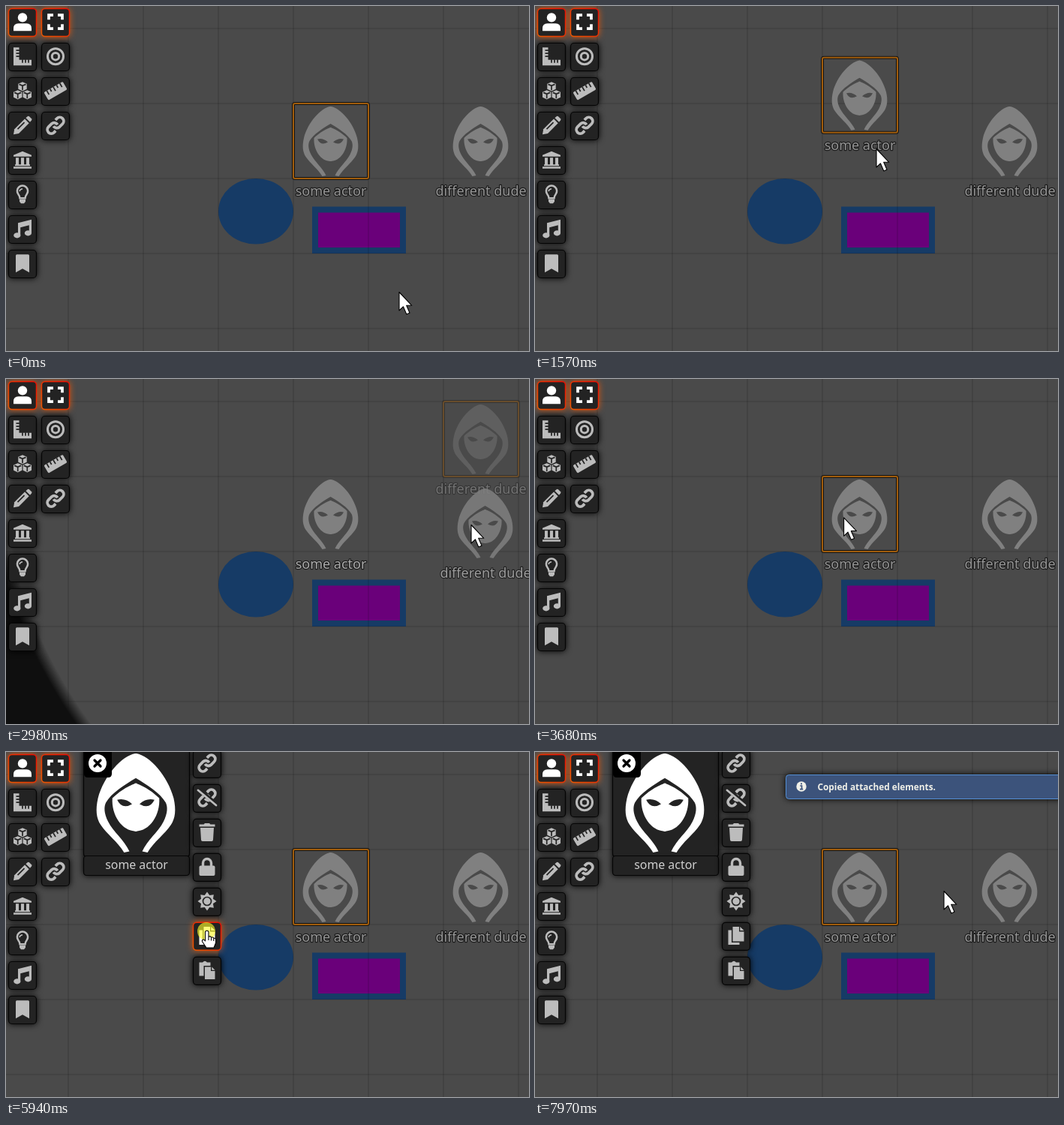
Recreate the animation shown at these times as an HTML page. Size 697 by 460 pixels, loop 8000 ms.

```html
<!DOCTYPE html>
<html lang="en">
<head>
<meta charset="utf-8">
<title>Token attachment</title>
<style>
  html, body { margin: 0; width: 100%; height: 100%; overflow: hidden; background: #4a4a4a; }
  svg { display: block; width: 697px; height: 460px; }
  text { font-family: "Noto Sans", "Open Sans", sans-serif; font-weight: 500; }
  .label { font-size: 18px; text-anchor: middle; paint-order: stroke; stroke: #1c1c1c; stroke-width: 2.4px; stroke-linejoin: round; }
  .icon { fill: currentColor; color: #bcbcbc; }
  .s { fill: none; stroke: currentColor; }
  .k { fill: none; stroke: #232323; stroke-width: 1.7; }
  .box { fill: #232323; stroke: #050505; stroke-width: 1.2; }
  .btn, .panel { filter: drop-shadow(0 0 4px #000); }
  .btn.on { filter: drop-shadow(0 0 4.5px #ff5a00c8); }
  .btn.on .box { stroke: url(#hot); stroke-width: 1.4; }
  .btn.on .icon { color: #fff; }
</style>
</head>
<body>
<svg viewBox="0 0 697 460">
  <defs>
    <linearGradient id="hot" x1="0" y1="1" x2="1" y2="0">
      <stop offset="0" stop-color="#f05a00"/><stop offset="1" stop-color="#f00800"/>
    </linearGradient>
    <radialGradient id="sight" gradientUnits="userSpaceOnUse" cx="633" cy="180" r="660">
      <stop offset=".975" stop-color="#0f0f0f" stop-opacity="0"/><stop offset="1" stop-color="#0f0f0f"/>
    </radialGradient>
    <g id="half">
      <path d="M51 4H49.5C37 6 20 25 14.5 46C12 57 13 65 17 71C23 80 33 87 39 97L44 96C39 85 29 78 24 68C20 60 20 54 22 50C27 41 40 33 50 27H51Z"/>
      <path fill-rule="evenodd" d="M51 32H50C41 35 33 41 28 46C27 62 37 77 50 77H51ZM32.5 47.5Q40 45.5 46.5 51.5Q37 57 32.5 47.5Z"/>
    </g>
    <g id="cowl"><use href="#half"/><use href="#half" transform="translate(100)scale(-1 1)"/></g>
  </defs>

  <rect width="697" height="460" fill="#4a4a4a"/>
  <g id="drawings" fill="#163b66">
    <ellipse cx="333" cy="273.75" rx="50" ry="43.75"/>
    <rect x="412" y="271.5" width="117" height="54.5" fill="#6a007a" stroke="#163b66" stroke-width="8"/>
  </g>
  <path id="grid" stroke="#000" stroke-opacity=".2" fill="none"/>
  <g id="tokens"></g>
  <rect id="dark" width="697" height="460" fill="url(#sight)"/>

  <g id="tools"></g>
  <g id="hud">
    <g class="panel">
      <rect class="box" x="103.5" y="-6" width="141" height="145" rx="3"/>
      <rect class="box" x="103.5" y="138.5" width="141" height="26" rx="4"/>
    </g>
    <use href="#cowl" fill="#fff" transform="translate(102 -3.7)scale(1.42)"/>
    <path d="M104 0H141V29Q141 34 136 34H109Q104 34 104 29Z"/>
    <circle cx="122" cy="15" r="12" fill="#fff"/>
    <path d="M118 11l8 8m0-8l-8 8" stroke="#000" stroke-width="3.2" stroke-linecap="round"/>
    <text x="174" y="156" font-size="15.9" text-anchor="middle" fill="#cfcfcf">some actor</text>
  </g>
  <g id="note">
    <rect class="panel" x="334.5" y="30.5" width="380" height="32" rx="4" fill="#3c537b" stroke="#5590d6"/>
    <circle cx="355" cy="46" r="6.7" fill="#f0f0e8"/>
    <path d="M353.3 45H355.5V49.5M353 49.7H357.2M354 42.3H356" stroke="#3c537b" stroke-width="1.7" fill="none"/>
    <text x="376.5" y="51" font-size="11.8" style="font-weight:600" fill="#f0f0e8">Copied attached elements.</text>
  </g>
  <circle id="click" r="12" fill="#ffff28" opacity=".62"/>
  <g id="cursor" fill="#fff" stroke="#000" stroke-width="1.1" stroke-linejoin="round">
    <path id="arrow" d="M0 .5V25L5.4 19.8L9.8 30L14 28.2L9.7 18.3H16.8Z"/>
    <g id="hand">
      <path d="M-1.5 13V1.5Q-1.5 -.8 .8 -.8Q3 -.8 3 1.5V7.3Q5.5 6 6.5 8.3Q9 7.2 9.8 9.4Q12.4 8.8 12.6 11.5V15.5L10 22H0L-5.5 13.7Q-6 10.8 -3.3 11Z"/>
      <path d="M3 7.5V12M6.5 8.5V12.5M9.8 9.8V13" fill="none"/>
    </g>
  </g>
</svg>
<script>
const $ = id => document.getElementById(id);
const ticks = (count, mark) => Array.from({ length: count }, (_, i) => mark(i)).join("");

const loop = `<path d="M-5 5.2H-8A5.2 5.2 0 0 1 -8 -5.2H-2A5.2 5.2 0 0 1 2.6 1.2"/>`;
const chain = `<g class="s" stroke-width="3.8" transform="rotate(-45)">${loop}<g transform="rotate(180)">${loop}</g></g>`;
const cube = (x, y) => `<g transform="translate(${x} ${y})">
  <path d="M0 -6L5.7 -3.5V3.5L0 6.2L-5.7 3.5V-3.5Z"/><path class="k" d="M-4.5 -2.8L0 -.8L4.5 -2.8M0 -.8V5"/></g>`;
const sunRays = ticks(16, i => {
  const r = i % 2 ? 8.6 : 12.5, a = i * Math.PI / 8;
  return `${r * Math.cos(a)},${r * Math.sin(a)} `;
});

const ICONS = {
  user: `<circle cy="-5.8" r="6.2"/><path d="M-12 12V8.5Q-12 2 -5.5 2H5.5Q12 2 12 8.5V12Z"/>`,
  expand: `<path class="s" stroke-width="3.7" d="M-9 -3V-9H-3M3 -9H9V-3M9 3V9H3M-3 9H-9V3"/>`,
  square: `<path d="M-12 -12H-4.5V4.5H12V12H-12Z"/>
    <path class="k" d="${ticks(3, i => `M-8.5 ${4 * i - 8}h4.5M${4 * i} 4v4.5`)}"/>`,
  target: `<g class="s" stroke-width="3"><circle r="10.5"/><circle r="4.7"/></g>`,
  cubes: cube(0, -6) + cube(-6.3, 5) + cube(6.3, 5),
  ruler: `<g transform="rotate(-30)"><rect x="-14.5" y="-6" width="29" height="12" rx="1.5"/>
    <path class="k" d="${ticks(5, i => `M${5 * i - 10} -6v${i % 2 ? 4 : 6}`)}"/></g>`,
  pencil: `<path d="M-12 12L-10.8 5L3 -8.7L8.7 -3L-5 10.8Z"/><path d="M4.4 -10L6.6 -12Q7.8 -12.8 9 -12L12 -9Q12.8 -7.8 12 -6.6L10 -4.4Z"/>
    <path class="k" d="M-6.5 5L2.5 -4"/>`,
  link: chain,
  bank: `<path d="M0 -11.5L12 -6.5V-4.5H-12V-6.5ZM-10 6H10V8H-10ZM-12 9H12V11.5H-12Z${ticks(3, i => `M${7 * i - 9} -3h4v9h-4Z`)}"/>`,
  bulb: `<path class="s" stroke-width="2.5" d="M-3.5 5Q-3.5 2.5 -5.5 0A7.1 7.1 0 1 1 5.5 0Q3.5 2.5 3.5 5Z"/>
    <path d="M-4 6.5H4V9.5L2 12H-2L-4 9.5Z"/><path class="s" stroke-width="1.5" d="M-4 -4Q-3.5 -7 0 -7.5"/>`,
  music: `<path d="M-6 -8L12 -12.5V6H8.8V-5L-2.8 -2V9H-6Z"/><ellipse cx="-7.2" cy="8.6" rx="4.6" ry="3.6"/><ellipse cx="7.4" cy="5.6" rx="4.6" ry="3.6"/>`,
  bookmark: `<path d="M-9 -10.5Q-9 -12 -7.5 -12H7.5Q9 -12 9 -10.5V12L0 7L-9 12Z"/>`,
  unlink: chain + `<path class="k" style="stroke-width:5" d="M-11 -11L13 9"/><path class="s" stroke-width="2.8" stroke-linecap="round" d="M-12 -10L12 10"/>`,
  trash: `<path d="M-10.5 -10.5H-4.5L-3 -12H3L4.5 -10.5H10.5V-7.5H-10.5ZM-9 -6H9L8 10Q8 12 6 12H-6Q-8 12 -8 10Z"/>`,
  lock: `<rect x="-10.5" y="-1.5" width="21" height="13.5" rx="2"/><path class="s" stroke-width="3.4" d="M-5.5 0V-5A5.5 5.5 0 0 1 5.5 -5V0"/>`,
  sun: `<polygon points="${sunRays}"/><circle class="k" r="5.5"/>`,
  copy: `<path d="M-4.5 -12H4V-5.5H10.5V7.5H-4.5ZM5.3 -12L10.5 -7H5.3Z"/><path d="M-10.5 -7.5H-6V9H4.5V12H-10.5Z"/>`,
  paste: `<path d="M-10.5 -10.5H-6Q-3 -14 0 -10.5H4.5V-6H-4.5V7.5H-10.5Z"/><path d="M-3 -4.5H5V1H10.5V12H-3ZM6.3 -4.5L10.5 -.3H6.3Z"/>`
};

const buttons = [];
function addButtons(id, names, x, y, lit) {
  names.split(" ").forEach((name, i) => {
    const cy = y + 46 * i;
    $(id).insertAdjacentHTML("beforeend", `<g class="btn" transform="translate(${x} ${cy})">
      <rect class="box" x="-18.5" y="-18.5" width="37" height="37" rx="4.5"/>
      <g class="icon" transform="translate(0 -.8)">${ICONS[name]}</g></g>`);
    buttons.push({ el: $(id).lastElementChild, x, y: cy, lit: name === lit, hud: id === "hud" });
  });
}
addButtons("tools", "user square cubes pencil bank bulb music bookmark", 22, 22, "user");
addButtons("tools", "expand target ruler link", 66, 22, "expand");
addButtons("hud", "link unlink trash lock sun copy paste", 268, 15.8);

$("grid").setAttribute("d", ticks(7, i => `M${83 + 100 * i} 0V460M0 ${30 + 100 * i}H697`));

function makeToken(name) {
  const edge = (color, width) => `<rect width="100" height="100" rx="2" stroke="${color}" stroke-width="${width}"/>`;
  $("tokens").insertAdjacentHTML("beforeend", `<g>
    <g class="frame" fill="none">${edge("#141414", 4)}${edge("#a05c0c", 2)}</g>
    <use href="#cowl" x="-.5" fill="#808080"/><text class="label" x="50" y="123">${name}</text></g>`);
  const el = $("tokens").lastElementChild;
  return { el, frame: el.querySelector(".frame"), text: el.querySelector("text") };
}

const STEP = 78.13, LOOP = 8000, GLIDE = .6;

// pointer moves: start ms, end ms, then where it comes to rest
const HOME = [524, 381], LINK = [77, 162], COPY = [267, 239];
const MOVES = [
  [0, 230, [436, 206]],
  [330, 720, [432, 82]],
  [1150, 1480, [455, 190]],
  [1590, 1950, [622, 185]],
  [2000, 2240, [614, 82]],
  [2640, 2960, [620, 194]],
  [3200, 3450, [436, 186]],
  [3540, 4370, LINK],
  [4920, 5700, COPY],
  [6800, 7655, LINK],
  [7670, 7965, [545, 185]]
];
// each drag: picked up, dropped, and the height the token then glides to
const ACTORS = [
  { name: "some actor", x: 383, drags: [{ pick: 390, drop: 805, lift: -100 }, { pick: 1150, drop: 1498, lift: 0 }] },
  { name: "different dude", x: 583, drags: [{ pick: 2040, drop: 2320, lift: -100 }, { pick: 2640, drop: 3060, lift: 0 }] }
];
for (const a of ACTORS) a.token = makeToken(a.name);
for (const a of ACTORS) {
  a.ghost = makeToken(a.name);
  a.ghost.frame.remove();
  a.ghost.el.setAttribute("opacity", .85);
}

const clamp = (v, lo = 0, hi = 1) => Math.min(hi, Math.max(lo, v));
const ease = p => p * p * (3 - 2 * p);
const within = (v, a, b) => v >= a && v < b;
const show = (el, on) => el.style.display = on ? "" : "none";
const place = (el, x, y) => el.setAttribute("transform", `translate(${x} ${y})`);

function pointer(t) {
  return MOVES.reduce((pos, [from, to, goal]) => {
    const p = ease(clamp((t - from) / (to - from)));
    return pos.map((v, i) => v + (goal[i] - v) * p);
  }, HOME);
}

const goalLift = (a, t) => a.drags.reduce((y, d) => t >= d.drop ? d.lift : y, 0);
const lift = (a, t) => a.drags.reduce((y, d) => {
  const reach = Math.max(0, t - d.drop) * GLIDE;
  return y + clamp(d.lift - y, -reach, reach);
}, 0);

function draw(now) {
  const t = Math.floor((now + 10) / STEP) * STEP;
  const [cx, cy] = pointer(t);
  const dudeChosen = within(t, 2020, 3510);
  const hudOpen = t >= 4750;

  place($("drawings"), 0, goalLift(ACTORS[0], t));

  ACTORS.forEach((a, i) => {
    const y = 130 + lift(a, t);
    const drag = a.drags.find(d => within(t, d.pick, d.drop));
    const hover = within(cx, a.x, a.x + 100) && within(cy, y, y + 100);
    place(a.token.el, a.x, y);
    a.token.el.setAttribute("opacity", drag ? .4 : 1);
    show(a.token.frame, hover || dudeChosen === (i === 1));
    show(a.ghost.el, drag);
    if (drag) {
      const [gx, gy] = pointer(drag.pick);
      place(a.ghost.el, a.x + cx - gx, y + cy - gy);
    }
    for (const k of [a.token, a.ghost]) k.text.setAttribute("fill", dudeChosen ? "#ababab" : "#959595");
  });
  $("sight").setAttribute("cy", 180 + lift(ACTORS[1], t));
  show($("dark"), dudeChosen);

  let hand = false;
  for (const b of buttons) {
    const over = (!b.hud || hudOpen) && Math.abs(cx - b.x) < 19 && Math.abs(cy - b.y) < 19;
    b.el.classList.toggle("on", b.lit || over);
    hand = hand || over;
  }
  show($("hud"), hudOpen);
  $("note").setAttribute("opacity", clamp((t - 6100) / 150));

  show($("click"), within(t, 4520, 4680) || within(t, 5930, 6010));
  place($("click"), cx, cy);
  place($("cursor"), cx, cy);
  show($("hand"), hand);
  show($("arrow"), !hand);
}

const start = performance.now();
function tick() {
  draw((performance.now() - start) % LOOP);
  requestAnimationFrame(tick);
}
tick();
</script>
</body>
</html>
```
